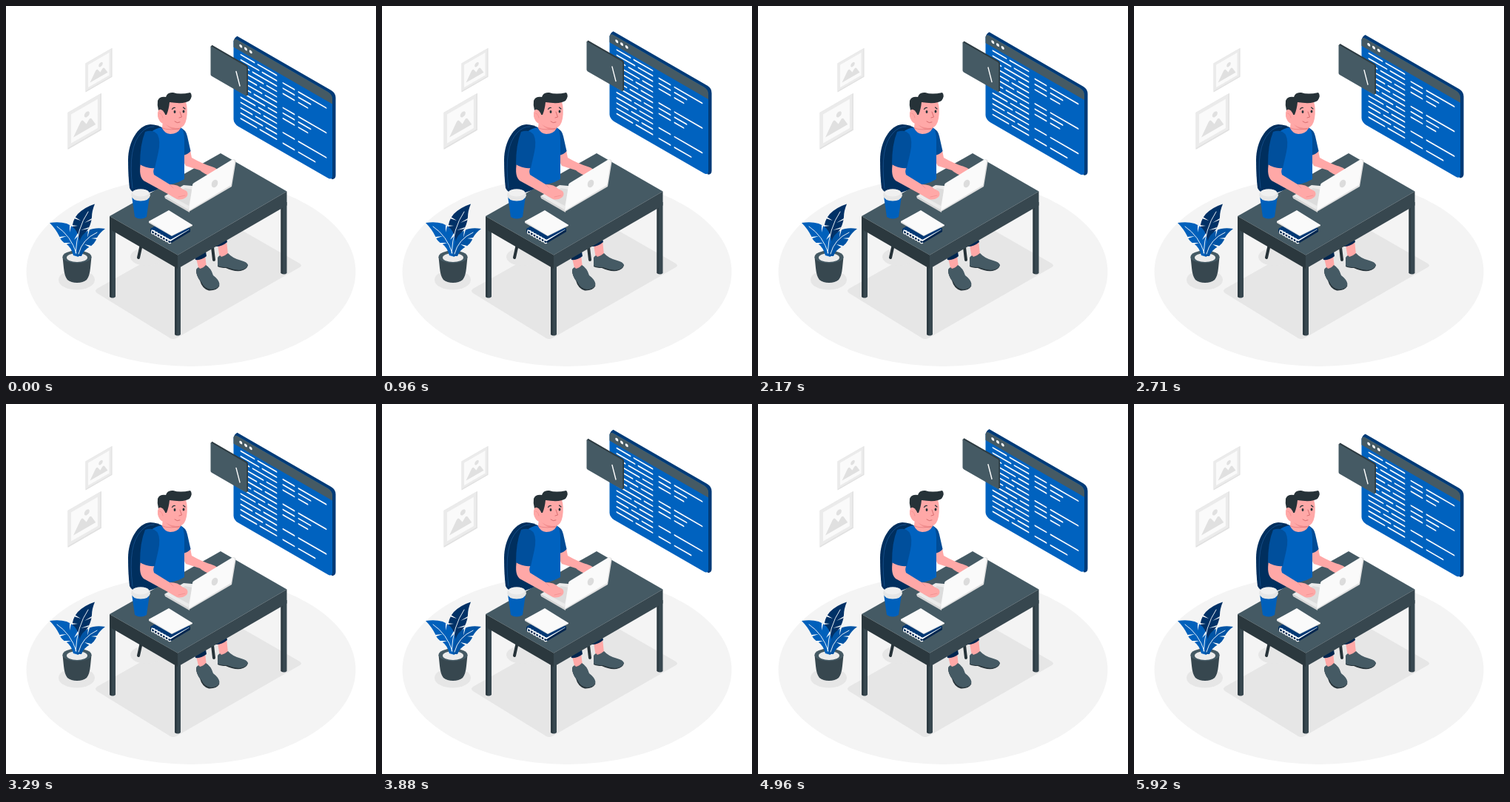
An HTML page for the animation above (5960 ms loop, 500 by 500 pixels).

```html
<!DOCTYPE html>
<html lang="en">
<head>
<meta charset="utf-8">
<title>Working at a desk</title>
<style>
  html, body { margin: 0; width: 100%; height: 100%; overflow: hidden; background: #fff; }
  svg { display: block; width: 100vw; height: 100vh; }
  .line { fill: none; stroke-linecap: round; stroke-linejoin: round; }
</style>
</head>
<body>
<svg viewBox="0 0 500 500">
  <defs>
    <g id="picture">
      <path fill="#e0e0e0" d="M0 0H36V39H0Z"/>
      <path fill="#ebebeb" d="M0 0H34.8V37.6H0Z"/>
      <path fill="#fafafa" d="M3.5 4H32V34.5H3.5Z"/>
      <path fill="#e0e0e0" d="M6 29.5 13.5 18Q15 16 16.5 18L20 23.5 22.5 20.5Q24 19 25.5 21L30 29.5Z"/>
      <circle cx="20.5" cy="13.5" r="2.8" fill="#e0e0e0"/>
    </g>
  </defs>

  <!-- floor and shadows -->
  <ellipse cx="250" cy="359" rx="222.5" ry="128" fill="#f4f4f4"/>
  <g fill="#e6e6e6">
    <path d="M123 382 288 289Q291 287 294 289L397 348Q401 351 397 353L230 449Q226 451 222 449L123 388Q119 385 123 382Z"/>
    <ellipse cx="190" cy="339" rx="22" ry="12"/>
    <ellipse cx="95.500" cy="370" rx="24.500" ry="13.500"/>
  </g>

  <!-- wall pictures -->
  <use href="#picture" transform="matrix(1 -.577 0 1 107.500 77.500)"/>
  <use href="#picture" transform="matrix(1.260 -.727 0 1.280 83.500 144)"/>

  <!-- plant -->
  <path fill="#37474f" d="M76.500 339 78 354Q79 365 83 370Q88 374 96 374Q104 374 109 370Q113 365 114 354L115.500 339Z"/>
  <ellipse cx="96" cy="339" rx="19.500" ry="8.500" fill="#455a64"/>
  <ellipse cx="96" cy="340" rx="14" ry="6" fill="#ebebeb"/>
  <path fill="#003166" d="M92 336Q86 316 89 304Q89 290 97 281Q106 272 120 267.500Q116 277 116 285Q115 297 108 306Q103 316 99 337Z"/>
  <path fill="#0060bb" d="M59 293Q72 291 82 294Q95 299 98 311Q102 325 98 339L91 337Q88 326 82 322Q74 318 72 311Q67 301 59 293Z"/>
  <path fill="#0054a5" d="M134 301Q120 299 112 303Q102 308 99 319Q95 329 96 338L102 338Q105 330 112 326Q120 322 123 313Q127 306 134 301Z"/>
  <path fill="#fff" d="M88 296 97 297 89 298ZM93 285 101 290 92 287ZM116 287 106 293 115.500 289ZM112 299 101 303 111 301Z"/>
  <path fill="#fff" d="M73 314 82 311 72 312ZM81 322 88 320 78 320ZM86 296 86 306 88 297ZM97 307 92 316 98 310ZM111 303 110 313 113 302ZM124 313 115 314 123 315ZM115 324 106 322 113 326Z"/>
  <path class="line" stroke="#fff" stroke-width=".9" d="M94 334Q96 300 111 278M95 334Q88 311 69 298M98 335Q103 315 123 306"/>

  <!-- chair -->
  <path class="line" stroke="#263238" stroke-width="4" d="M183 322 179 340M279 326 281 343"/>
  <path fill="#002f5e" d="M165 208C165 184 178 161 195 160Q205 160 214 166V245L182 256Q170 253 167 246Q165 230 165 208Z"/>
  <path class="line" stroke="#1d5695" stroke-width=".7" d="M171 246Q164 190 183 171Q190 163 200 163"/>

  <!-- legs -->
  <path fill="#ffa8a7" d="M257 341 269 336 271 354 261 358ZM286 323 298 317 300 336 289 341Z"/>
  <path fill="#00264f" d="M253 330 269 326 271 338Q264 344 256 343ZM280 312 296 308 299 319Q292 325 284 325Z"/>
  <path fill="#263238" d="M257 357Q257 364 262 371Q265 382 274 384.500Q285 385 288.500 378L285 373 267 360ZM286 341V352Q290 354 297 354Q307 359 317 358Q326 356 327 350L320 348Z"/>
  <path fill="#455a64" d="M257 356Q260 351 262 355Q267 354 270 350Q277 354 280 364Q288 370 288.500 376Q287 383 277 383Q268 382 264 373Q257 366 257 356ZM286 340Q289 335 291 339Q297 337 300 334Q306 341 318 344Q326 346 327 350Q325 356 315 357Q306 356 298 353Q290 353 286 351Z"/>

  <!-- desk -->
  <path fill="#37474f" d="M371.500 265H379.500V361Q376 364 371.500 361ZM140 294H148V393Q144 396 140 393ZM228 348H236V444Q232 447 228 444Z"/>
  <path fill="#2d3b42" d="M140 294H143V394L140 393ZM228 348H231V445L228 444ZM371.500 265H374V362L371.500 361Z"/>
  <path fill="#455a64" d="M140 284 290 199 379.500 250.500 232 336.500Z"/>
  <path fill="#2b383e" d="M140 284 232 336.500V355L140 301.500Z"/>
  <path fill="#37474f" d="M232 336.500 379.500 250.500V269.500L232 355Z"/>

  <!-- far arm and body -->
  <path fill="#ffa8a7" d="M239 196 249 194Q250 201 251 205Q265 213 278 217Q287 220 287 224L278 230Q267 227 262 222L243 216Q239 211 239 196Z"/>
  <path fill="#004c96" d="M235 164Q243 167 245 176L249.500 196Q246 201 238 202Z"/>
  <path fill="#0062bf" d="M195 171Q202 165 211 164Q224 178 236 164Q241 168 241 181V234Q226 243 207 242Q196 232 197 217Z"/>

  <!-- head -->
  <path fill="#ffa8a7" d="M212 154 236 158 236 165Q232 173 222 173Q214 172 211 165Z"/>
  <path fill="#f28f8f" d="M216 160Q224 166 234 164L235 167Q224 169 216 160Z"/>
  <path fill="#ffa8a7" d="M214 131Q229 124 243 129Q246 140 244 152Q242 163 235 165Q224 165 216 159L211 157Q205 152 205 145Q207 138 213 141Z"/>
  <path fill="#263238" d="M206 141Q204 134 205 128Q207 122 216 123Q218 116 226 117Q235 120 249 117Q253 121 248 128Q241 133 221 130Q220 140 217 147H214Q213 140 206 141Z"/>
  <path fill="#ffa8a7" d="M215 146Q210 137 206 141Q203 149 208 156Q213 162 216 155Z"/>
  <path class="line" stroke="#f28f8f" stroke-width=".8" d="M207.500 145Q211 145 212 151"/>
  <g fill="#263238">
    <ellipse cx="228" cy="143" rx="1.400" ry="1.900"/>
    <ellipse cx="240" cy="142.500" rx="1.400" ry="1.900"/>
  </g>
  <path class="line" stroke="#263238" stroke-width="1.200" d="M224.500 139.500Q226 137 228.500 137.500M239.500 137 242 139"/>
  <path class="line" stroke="#d76d70" stroke-width="1" d="M235 143 237.500 150 234 151M228 156Q231 159 235 157"/>
  <path class="line" stroke="#e57d80" stroke-width=".8" d="M211 165Q223 169 236 165"/>

  <!-- laptop -->
  <path fill="#d6d6d6" d="M214 257 248 275V279L215 260Z"/>
  <path fill="#ebebeb" d="M214 257 240 242 262 244 248 276Z"/>
  <path fill="#dcdcdc" d="M223 257 242 246 252 248 247 270Z"/>

  <!-- near arm -->
  <path fill="#ffa8a7" d="M182 212 201 217Q198 223 200 228L221 241Q233 241 238 247L244 250Q247 254 244 258Q238 263 231 261L217 253 186 236Q179 230 182 212Z"/>
  <path class="line" stroke="#f28f8f" stroke-width=".8" d="M233 258 242 256M221 241 226 246"/>
  <path fill="#004f9c" d="M188 170Q199 166 205 174Q209 183 206 197L201 219Q190 220 181 214Q181 187 188 170Z"/>

  <path fill="#e0e0e0" d="M306 207Q311 207 310.500 211L305 244 248 277.500 246 274Z"/>
  <path fill="#fafafa" d="M254 239 304 208.500Q309 206 309 210L304 242 247 276.500 252 242Q252 240 254 239Z"/>
  <ellipse cx="282" cy="240" rx="4" ry="5.500" fill="#dcdcdc" transform="rotate(24 282 240)"/>

  <!-- coffee cup -->
  <path fill="#0060bb" d="M170 257H194L190 285Q182 290 174 285Z"/>
  <path fill="#e6e6e6" d="M169 256Q169 253 171 251Q173 247.500 182 247.500Q191 247.500 193 251Q195 253 195 256Q193 263.500 182 263.500Q171 263.500 169 256Z"/>
  <ellipse cx="182" cy="252.500" rx="11" ry="5" fill="#f0f0f0"/>

  <!-- notebook and paper -->
  <path fill="#00264f" d="M195 302 223 286 249 301V305L222 321 195 306Z"/>
  <path fill="#fff" d="M196 303 223 287 248 302 222 318Z"/>
  <path fill="#003874" d="M195 301 223 285 249 301 222 316Z"/>
  <path fill="#e0e0e0" d="M193 291 220 277 252 296V297L224 311 193 293Z"/>
  <path fill="#fafafa" d="M193 291 220 276 252 296 224 310Z"/>
  <g id="rings" class="line" stroke="#fff" stroke-width="1.200"></g>

  <!-- floating windows -->
  <g id="float">
    <g transform="matrix(1 .577 0 1 307.500 42.500)">
      <path fill="#003b78" d="M0 5Q1 0 5 -4.600H132Q138 -4.600 138 2V107Q138 112 133 115Z"/>
      <rect width="133.500" height="116.500" rx="6" fill="#0062bf"/>
      <path fill="#455a64" d="M0 13V6Q0 0 6 0H127.500Q133.500 0 133.500 6V13Z"/>
      <g fill="#fff">
        <circle cx="9.800" cy="6" r="2"/>
        <circle cx="16.500" cy="6" r="2"/>
        <circle cx="23.200" cy="6" r="2"/>
      </g>
      <g id="code" class="line" stroke="#fff" stroke-width="1.900"></g>
    </g>
    <g transform="matrix(1 .577 0 1 276.500 54)">
      <path fill="#2c3a41" d="M0 1 2 -2.300H49Q50.500 -2.300 50.500 0V37L48 40Z"/>
      <rect width="48.800" height="40" rx="1.500" fill="#455a64"/>
    </g>
    <path class="line" stroke="#fff" stroke-width="1.400" d="M311 88.500 316 108"/>
  </g>
</svg>
<script>
  const byId = id => document.getElementById(id);
  const setPath = (id, d) => { byId(id).innerHTML = `<path d="${d}"/>`; };
  const rowStep = 7.2;
  let lines = '';

  // Left column: each row has one break
  [28, 34, 21, 40, 31, 38, 23, 42, 29, 36, 25, 39, 31].forEach((gap, i) => {
    const y = 17.6 + rowStep * i;
    lines += `M10 ${y}H${gap}M${gap + 5} ${y}H58`;
  });

  // Right column: three groups, given by the ends of their rows (0 is blank)
  [[125, 104, 100], [125, 104, 100], [125, 0, 110]].forEach((group, g) => {
    group.forEach((end, i) => {
      const y = 23 + 33.5 * g + rowStep * i;
      if (end) lines += `M67 ${y}H82M88 ${y}H${end}`;
    });
  });
  setPath('code', lines);

  let rings = '';
  for (let i = 0; i < 7; i++) {
    rings += `M${201 + i * 3.7} ${304 + i * 2.1}q-5 -2 -4.500 2q1 3 4 1.500`;
  }
  setPath('rings', rings);

  // Linear rise and fall of 10 units, twice per loop
  const half = 1490;
  function draw() {
    const phase = performance.now() % (2 * half) / half;
    const lift = 10 * (1 - Math.abs(phase - 1));
    byId('float').setAttribute('transform', `translate(0 ${-lift})`);
    requestAnimationFrame(draw);
  }
  draw();
</script>
</body>
</html>
```
